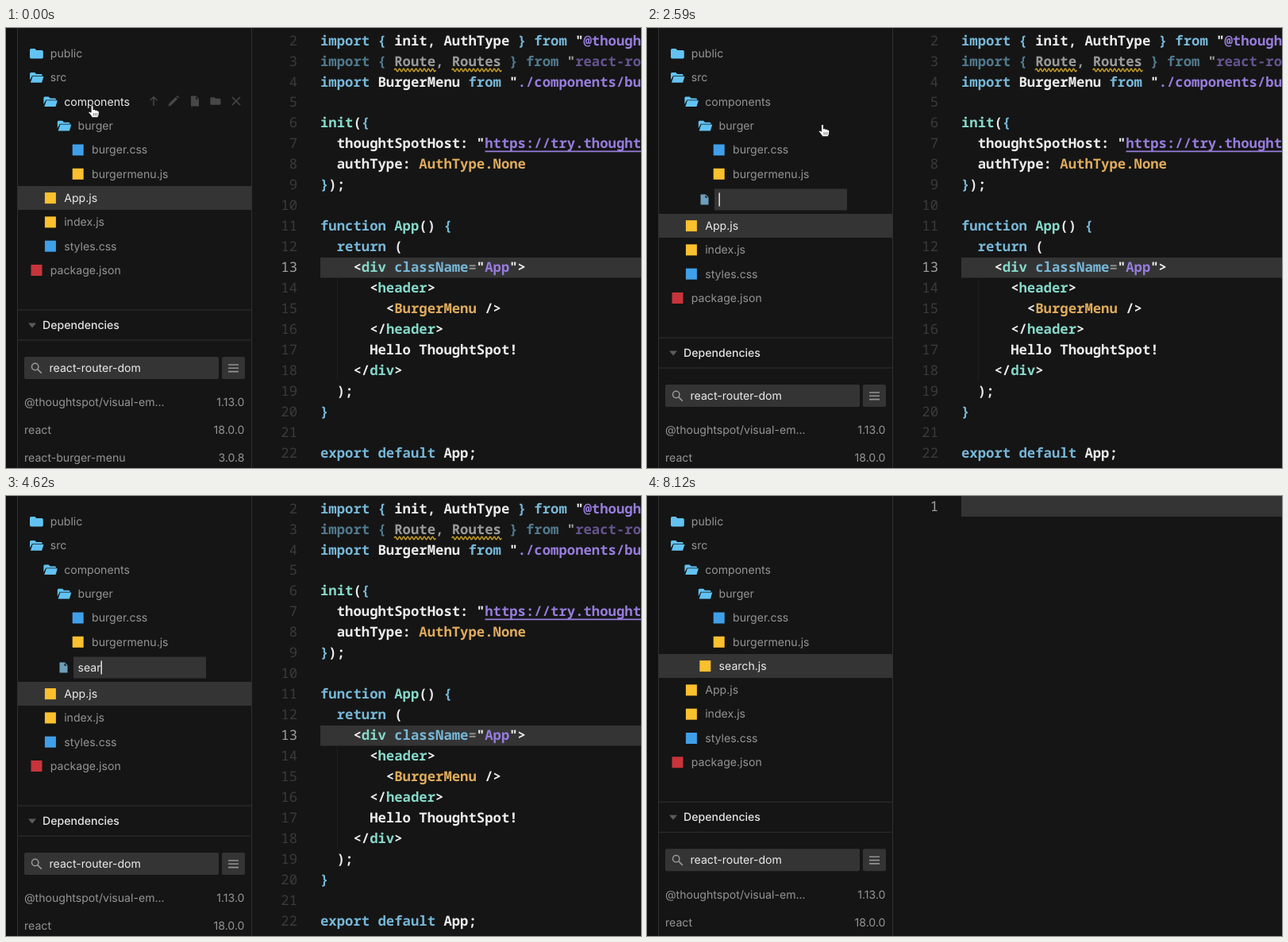
Recreate the animation shown at these times as an HTML page. Size 800 by 554 pixels, loop 8.19 s.

```html
<!DOCTYPE html>
<html lang="en">
<head>
<meta charset="utf-8">
<title>Creating a file in an editor</title>
<style>
html, body { margin: 0; width: 100%; height: 100%; overflow: hidden; background: #151515; }
svg { display: block; width: 800px; height: 554px; }
text { white-space: pre; text-rendering: geometricPrecision; }
.ui { font: 14.1px Inter, sans-serif; fill: #949494; }
.ui.bright { fill: #ececec; }
.ui.title { font-weight: 500; fill: #e6e6e6; }
.code { font: 600 17.27px "Noto Sans Mono", "DejaVu Sans Mono", monospace; fill: #ececec; }
.num { fill: #3b3b3b; font-weight: 500; text-anchor: end; }
.num.active { fill: #a0a0a0; }
.b { fill: #77b7d7; } .g { fill: #86d9ca; } .p { fill: #977cdc; }
.o { fill: #dfab5c; } .d { fill: #8b8b8b; } .w { fill: #ececec; }
.menu { font: 700 13px Roboto, sans-serif; fill: #8f9396; }
.sel { fill: #343434; }
.rule { stroke: #303030; }
</style>
</head>
<body>
<svg id="stage" viewBox="0 0 800 554">
  <defs>
    <path id="folder" d="M-8.5-4.5q0-1.7 1.7-1.7h4.6l2 2h6.8q1.7 0 1.7 1.7v7q0 1.7-1.7 1.7H-6.8q-1.7 0-1.7-1.7z"/>
    <path id="opened" d="M-8.5-5q0-1.5 1.5-1.5h4.7l2 2h6q1.5 0 1.5 1.5v.6H-5.6L-8.5 3zM-5-1.7h14L6.6 6.2H-7.6z"/>
    <path id="file" d="M-5-6.5H1.5L5-3V6.5H-5zM1-5.5V-2.3h3.2z" fill-rule="evenodd"/>
    <path id="arrow" d="M0 6V-5M-4.5-.8L0-5.3 4.5-.8" fill="none" stroke-width="1.5"/>
    <path id="pencil" d="M-6.5 6.5l.8-3.2L2.6-5 5-2.6-3.3 5.7zM3.4-5.8L4.8-7 7-4.8 5.8-3.4z"/>
    <path id="cross" d="M-5-5L5 5M5-5L-5 5" fill="none" stroke-width="1.5"/>
    <path id="bin" d="M-5-6h3l.8-1h2.4L2-6h3v1.5H-5zM-4.3-3.4h8.6L3.7 6.5h-7.4zM-2-1.5v6h1v-6zM1-1.5v6h1v-6z" fill-rule="evenodd"/>
    <path id="beamShape" d="M-3.5-8Q0-8 0-5.5V5.5Q0 8-3.5 8M3.5-8Q0-8 0-5.5M0 5.5Q0 8 3.5 8M-2 1.5H2"/>
    <clipPath id="menuClip"><rect id="menuMask" x="100" y="90" width="250"/></clipPath>
    <filter id="shadow" x="-20%" y="-20%" width="140%" height="140%"><feGaussianBlur stdDeviation="4"/></filter>
  </defs>
  <rect width="800" height="554" fill="#151515"/>
  <rect width="14" height="554" fill="#111"/>
  <g id="editor"></g>
  <g id="blank">
    <rect class="sel" x="396" width="404" height="26"/>
    <text class="code num active" x="367" y="19">1</text>
    <rect id="editorCaret" x="396" y="1" width="2" height="24" fill="#ddd"/>
  </g>
  <g id="tree"></g>
  <g id="created"></g>
  <g id="lower"></g>
  <path class="rule" d="M14.5 0V554M309.5 0V554"/>
  <g id="naming">
    <use href="#file" x="72.5" y="216" fill="#6c9fbb"/>
    <rect class="sel" x="85" y="202.5" width="167" height="27"/>
    <text id="typed" class="ui bright" x="90.5" y="220.7"></text>
    <rect id="caret" y="207.5" width="1.3" height="17" fill="#fff"/>
  </g>
  <g id="actions" fill="#a2a2a2" stroke="#a2a2a2" stroke-width="0">
    <use href="#arrow" x="186" y="92"/><use href="#pencil" x="211" y="92"/>
    <use href="#file" x="238" y="92"/><use href="#folder" transform="translate(264 92) scale(.78)"/>
    <use href="#cross" x="290" y="92"/>
  </g>
  <g id="menu" clip-path="url(#menuClip)"></g>
  <g id="hand">
    <path d="M-1.4 1.2Q0-.8 1.5 1.2V6Q3.2 4.9 4 6.5 5.8 5.6 6.5 7.2 8.8 6.7 8.8 9.2 8.9 13 7 15.8H0.2Q-2.2 12-4.7 9.2-4.3 7.2-1.4 9.3z" fill="#fff" stroke="#111" stroke-width=".9"/>
    <path d="M2 10v3.6M4 10v3.6M6 10v3.6" stroke="#444" stroke-width=".7"/>
  </g>
  <g id="beam" fill="none">
    <use href="#beamShape" stroke="#fff" stroke-width="3.4"/>
    <use href="#beamShape" stroke="#222" stroke-width="1.2"/>
  </g>
</svg>
<script>
const LOOP = 8190, MENU_AT = 540, MENU_TIME = 130, INPUT_AT = 2540, DONE_AT = 6440;
const ROW = 30.3, LINE = 25.96, CHAR = 10.362, CODE_X = 396;
const FILE_NAME = "search.js";
const KEY_TIMES = [3900, 4130, 4340, 4560, 4800, 5010, 5310, 5530, 5740];
const SKY = "#62c3f3", YELLOW = "#fac02e", BLUE = "#409fe9", RED = "#c7343b";
const $ = id => document.getElementById(id);
const escapeText = s => s.replace(/&/g, "&amp;").replace(/</g, "&lt;");
const label = (x, y, s, cls = "ui", extra = "") =>
  `<text class="${cls}" x="${x}" y="${y}" ${extra}>${escapeText(s)}</text>`;
const icon = (name, x, y, color) => `<use href="#${name}" x="${x}" y="${y}" fill="${color}"/>`;
const badge = (x, y, color) => `<rect x="${x - 7}" y="${y - 7}" width="14" height="14" fill="${color}"/>`;
const rowY = i => 32.3 + i * ROW;

// A named icon, or a plain square when only a colour is given.
function treeRow(i, depth, name, kind, id = "") {
  const x = 38.5 + depth * 17.4, y = rowY(i);
  const mark = kind[0] === "#" ? badge(x, y, kind) : icon(kind, x, y, SKY);
  return mark + label(x + 17.3, y + 4.8, name, "ui", id && `id="${id}"`);
}
const selection = (i, id) =>
  `<rect id="${id}" class="sel" x="14" y="${rowY(i) - 15.1}" width="295" height="30"/>`;

$("tree").innerHTML =
  treeRow(0, 0, "public", "folder") + treeRow(1, 0, "src", "opened") +
  treeRow(2, 1, "components", "opened", "components") + treeRow(3, 2, "burger", "opened") +
  treeRow(4, 3, "burger.css", BLUE) + treeRow(5, 3, "burgermenu.js", YELLOW);
$("created").innerHTML = selection(6, "newSel") + treeRow(6, 2, FILE_NAME, YELLOW, "newName");
$("newName").classList.add("bright");

const packages = [["@thoughtspot/visual-em...", "1.13.0"], ["react", "18.0.0"], ["react-burger-menu", "3.0.8"]];
$("lower").innerHTML =
  selection(6, "appSel") + treeRow(6, 1, "App.js", YELLOW, "appName") +
  treeRow(7, 1, "index.js", YELLOW) + treeRow(8, 1, "styles.css", BLUE) +
  treeRow(9, 0, "package.json", RED) +
  `<path class="rule" d="M15 355H309M15 393H309"/>
   <path d="M28 371.5h10l-5 6z" fill="#5c5c5c"/>` +
  label(46, 379, "Dependencies", "ui title") +
  `<rect class="sel" x="23" y="414" width="245" height="28" rx="2"/>
   <rect class="sel" x="272" y="414" width="29" height="28" rx="2"/>
   <path d="M280 424h13M280 428.3h13M280 432.6h13" stroke="#929292" stroke-width="1.6"/>
   <g fill="none" stroke="#999" stroke-width="1.5"><circle cx="36.7" cy="426.5" r="4.2"/><path d="M39.8 429.6l5 5"/></g>` +
  label(54.5, 433, "react-router-dom", "ui bright") +
  packages.map(([name, version], i) => label(23, 476.3 + i * 35, name) +
    label(300.5, 476.3 + i * 35, version, "ui", 'text-anchor="end"')).join("");

// Tokens are split by "|"; the first letter of each is its colour class.
const code = [
  'bimport { |winit, AuthType |b} from |w"|p@thoughtspot',
  'bimport { |wRoute, Routes |b} from |w"|preact-router',
  'bimport |wBurgerMenu |bfrom |w"|p./components/burger',
  '',
  'ginit|w(|b{',
  'w  thoughtSpotHost: "|phttps://try.thoughtspot',
  'w  authType: |oAuthType.None',
  'b}|w);',
  '',
  'bfunction |gApp|w() |b{',
  'b  return |w(',
  'w    <|gdiv |bclassName|d=|w"|pApp|w">',
  'w      <|gheader|w>',
  'w        <|oBurgerMenu|w />',
  'w      </|gheader|w>',
  'w      Hello ThoughtSpot!',
  'w    </|gdiv|w>',
  'w  );',
  'b}',
  '',
  'bexport default |wApp;'
];
const codeLine = (line, i) => {
  const y = 21.6 + i * LINE;
  const spans = line.split("|").map(s => `<tspan class="${s[0] || "w"}">${escapeText(s.slice(1))}</tspan>`).join("");
  return label(367, y, String(i + 2), i === 11 ? "code num active" : "code num") +
    `<text class="code" x="${CODE_X}" y="${y}" ${i === 1 ? 'opacity=".62"' : ""}>${spans}</text>`;
};
const squiggle = (col, length) => {
  const waves = Math.round(length * CHAR / 5.2);
  return `<path d="M${CODE_X + col * CHAR} 53${"q1.3-3.4 2.6 0t2.6 0".repeat(waves)}" fill="none" stroke="#c9a227" stroke-width="1.5"/>`;
};
$("editor").innerHTML =
  '<rect class="sel" x="396" y="289" width="404" height="25.5"/>' +
  '<path d="M417.5 315V444" stroke="#1e1e1e"/>' +
  code.map(codeLine).join("") + squiggle(9, 5) + squiggle(16, 6) +
  '<path d="M603.5 155.3H800" stroke="#977cdc" stroke-width="1.7"/>';

const items = [["file", "Create File", 126.5], ["folder", "Create Directory", 165],
  ["arrow", "Upload Files", 203], ["pencil", "Rename", 241], ["bin", "Delete", 278]];
$("menu").innerHTML =
  `<rect x="118" y="106" width="211" height="195" fill="#101214" opacity=".5" filter="url(#shadow)"/>
   <rect x="118" y="104" width="211" height="196" fill="#14181a"/>
   <g id="menuHover"><rect x="118" y="108" width="211" height="38" fill="#222a2e"/>
   <rect x="118" y="108" width="3" height="38" fill="#40a9f3"/></g>` +
  items.map(([name, text, y], i) =>
    `<g ${i ? "" : 'id="firstItem"'} class="menu"><use href="#${name}" transform="translate(146.5 ${y}) scale(.85)"
      ${name === "arrow" ? 'stroke="#8f9396"' : ""}/><text x="168" y="${y + 4.6}">${text}</text></g>`).join("");

const clamp = v => Math.max(0, Math.min(1, v));
const ease = v => v * v * (3 - 2 * v);
const mix = (a, b, k) => a + (b - a) * k;
const show = (id, on) => { $(id).style.display = on ? "" : "none"; };
const place = (id, x, y) => $(id).setAttribute("transform", `translate(${x} ${y})`);
const phase = (t, from, to) => ease(clamp((t - from) / (to - from)));

// Stops: time, x, y
const pointerPath = [[0, 108.5, 97], [500, 108.5, 91.5], [1100, 108.5, 91.5], [1750, 221, 121],
  [2600, 221, 121], [3000, 151, 213]];
function pointerAt(t) {
  const next = pointerPath.findIndex(stop => stop[0] > t);
  if (next < 0) return pointerPath.at(-1).slice(1);
  const [t0, x0, y0] = pointerPath[next - 1], [t1, x1, y1] = pointerPath[next];
  const k = phase(t, t0, t1);
  return [mix(x0, x1, k), mix(y0, y1, k)];
}

function draw(t) {
  const naming = t >= INPUT_AT && t < DONE_AT, done = t >= DONE_AT;
  const [x, y] = pointerAt(t);
  const overItem = x > 121 && y > 94 && t < INPUT_AT;
  const overFolder = t < INPUT_AT && !overItem;

  place("lower", 0, naming ? 35 : done ? ROW : 0);
  show("created", done);
  show("appSel", !done);
  $("appName").classList.toggle("bright", !done);
  show("editor", !done);
  show("blank", done);
  show("editorCaret", Math.floor((t - DONE_AT) / 560) % 2 === 0);

  $("components").classList.toggle("bright", overFolder);
  show("actions", overFolder);
  $("actions").setAttribute("opacity", mix(0.35, 1, clamp(t / 350)));

  const grow = clamp((t - MENU_AT) / MENU_TIME);
  show("menu", t >= MENU_AT && t < INPUT_AT);
  $("menu").setAttribute("opacity", Math.min(1, grow * 1.22));
  $("menuMask").setAttribute("height", mix(14, 222, grow) - (grow < 1 ? 7 : 0));
  show("menuHover", overItem);
  $("firstItem").style.fill = overItem ? BLUE : "";

  show("naming", naming);
  if (naming) {
    const count = KEY_TIMES.filter(k => k <= t).length;
    $("typed").textContent = FILE_NAME.slice(0, count);
    $("caret").setAttribute("x", 90.5 + (count ? $("typed").getComputedTextLength() : 0));
    const since = t - (count ? KEY_TIMES[count - 1] : INPUT_AT);
    show("caret", Math.floor(since / 500) % 2 === 0);
  }

  const overInput = t >= INPUT_AT && y > 200;
  show("hand", t < INPUT_AT || (t < KEY_TIMES[0] && !overInput));
  show("beam", overInput && t < KEY_TIMES[0]);
  place("hand", x, y);
  place("beam", x, y);
}

const start = performance.now();
function tick() {
  draw((performance.now() - start) % LOOP);
  requestAnimationFrame(tick);
}
draw(0);
requestAnimationFrame(tick);
</script>
</body>
</html>
```
